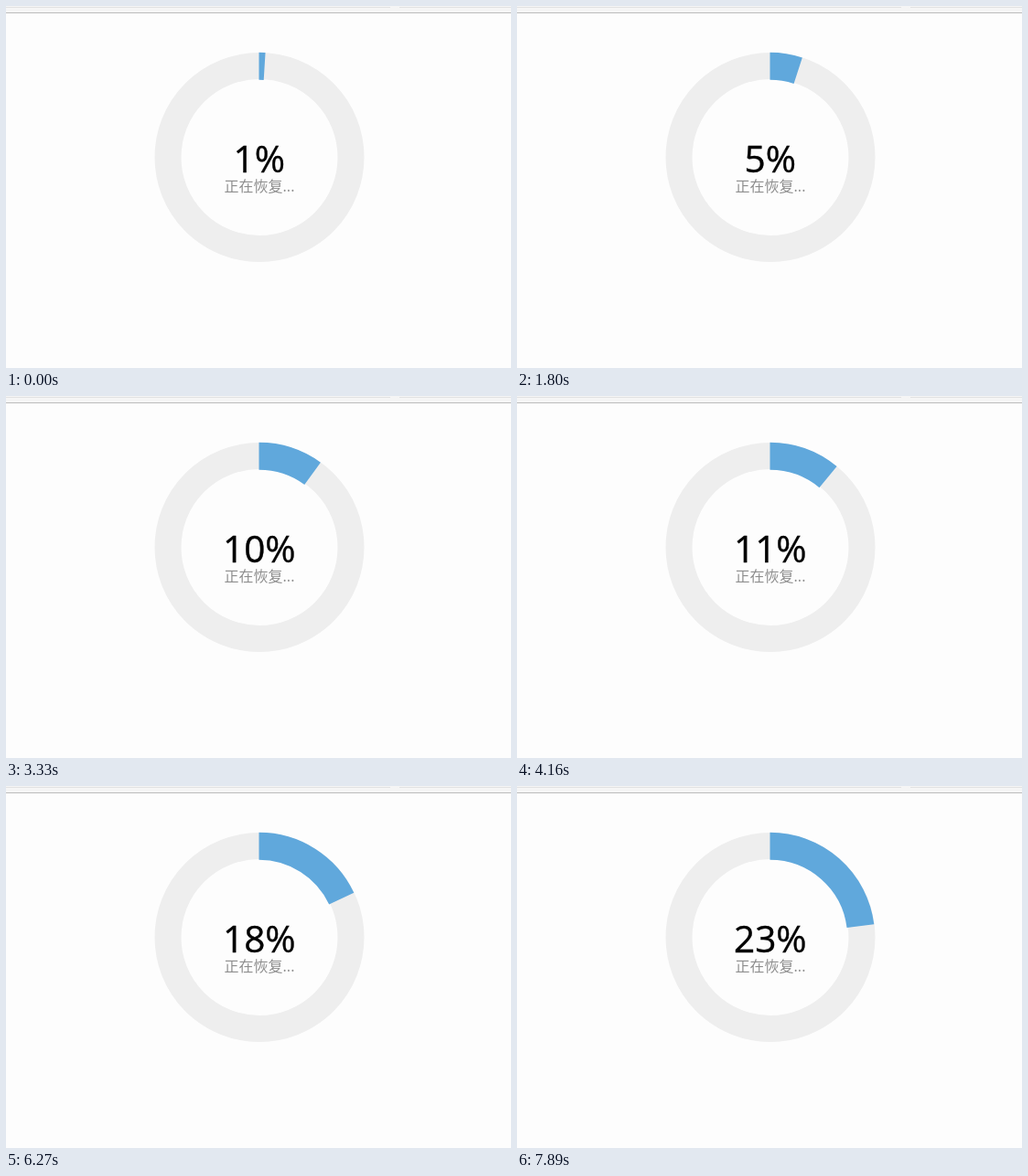
These frames come from a looping animation (552x396 px, 8000 ms). An HTML page:

```html
<!DOCTYPE html>
<html lang="zh-CN">
<head>
<meta charset="utf-8">
<style>
html, body { margin: 0; width: 100%; height: 100%; overflow: hidden; background: #fdfdfd; }
svg { display: block; }
text { text-anchor: middle; font-family: "Open Sans", "Noto Sans CJK SC", "Noto Sans CJK", sans-serif; }
circle { fill: none; }
#count { font-size: 40.5px; stroke: #000; stroke-width: .4; }
</style>
</head>
<body>
<svg width="552" height="396" viewBox="0 0 552 396">
  <rect width="552" height="7" fill="#f5f5f5"/>
  <path d="M0 1.5H420M430 1.5H552" stroke="#e2e2e2"/>
  <path d="M0 7.5H552" stroke="#bcbcbc"/>
  <circle cx="277" cy="165.5" r="100" stroke="#eee" stroke-width="29"/>
  <circle id="arc" cx="276.5" cy="165.5" r="99.7" stroke="#60a8dc" stroke-width="30" pathLength="100" transform="rotate(-90 276.5 165.5)"/>
  <text id="count" x="276.8" y="182"></text>
  <text x="277" y="203" font-size="16" fill="#8e8e8e">正在恢复...</text>
</svg>
<script>
const LOOP = 8000, DELAY = 480, BEAT = 560;
const arc = document.getElementById("arc");
const count = document.getElementById("count");

// Progress jumps by one or two percent on each beat.
function percentAt(t) {
  const beat = Math.max(0, Math.floor((t - DELAY) / BEAT));
  return Math.floor(1.65 + 1.7 * beat);
}

function draw() {
  const percent = percentAt(performance.now() % LOOP);
  arc.setAttribute("stroke-dasharray", `${percent} 100`);
  count.textContent = percent + "%";
  requestAnimationFrame(draw);
}
draw();
</script>
</body>
</html>
```
